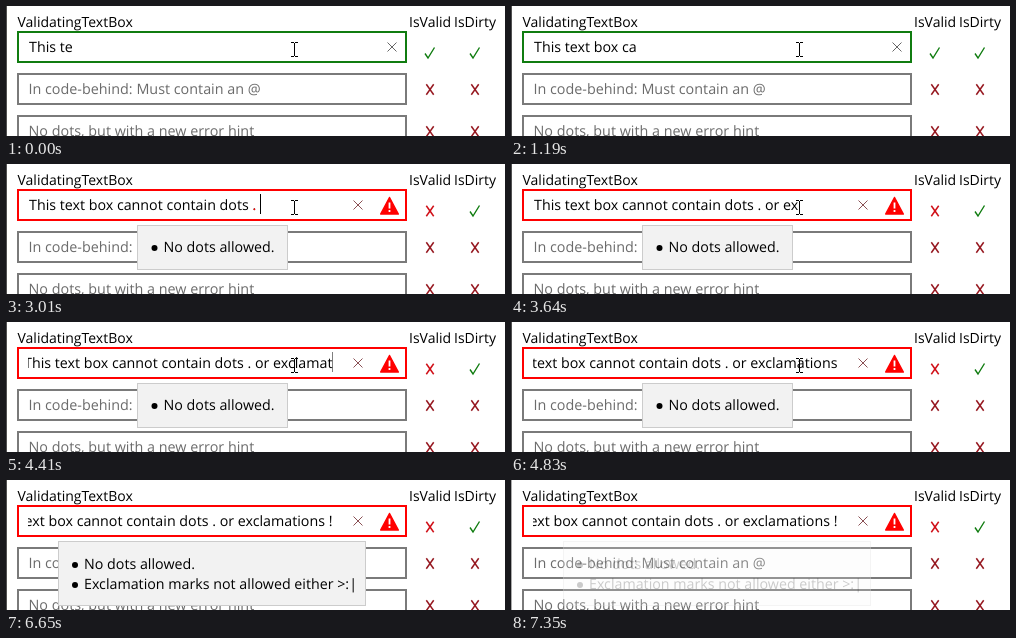
Animation of 499 by 130 pixels, one loop 7.42 s. Source, as an HTML page with a canvas:

```html
<!DOCTYPE html>
<html lang="en">
<head>
<meta charset="utf-8">
<title>Validating text box</title>
<style>
  html, body { margin: 0; width: 100%; height: 100%; overflow: hidden; background: #fff; }
  canvas { display: block; }
</style>
</head>
<body>
<canvas id="stage" width="499" height="130"></canvas>
<script>
const ctx = document.getElementById('stage').getContext('2d');
const LOOP = 7420, TICK = 70;
const ERROR_AT = 2870, SECOND_ERROR_AT = 5180, BLUR_AT = 7140;
const GREEN = '#107c10', RED = '#ff0000', DARK_RED = '#961820', GRAY = '#7a7a7a';
const LEFT = 23;

// Each burst is typed one character per tick.
const bursts = [
  [70, 'xt'], [560, ' b'], [840, 'o'], [980, 'x can'], [1400, 'not '],
  [1750, 'contain'], [2240, ' '], [2310, 'd'], [2450, 'ots'], [2800, ' '],
  [2870, '. '], [3150, 'o'], [3360, 'r e'], [3640, 'x'], [3920, 'cla'],
  [4270, 'matio'], [4690, 'n'], [4830, 's '], [5180, '!']
];
const caretOn = [
  [210, 560], [1260, 1400], [1540, 1610], [2170, 2450], [3010, 3150],
  [3220, 3360], [4130, 4270], [4900, 5320], [5880, 6300], [6790, BLUR_AT]
];
const caretFading = [4410, 5320, 5810, 6300, 6720];

function typedText(t) {
  let text = 'This te';
  for (const [start, chars] of bursts) {
    if (t >= start) text += chars.slice(0, Math.floor((t - start) / TICK) + 1);
  }
  return text;
}

function caretAlpha(t) {
  if (caretOn.some(([from, to]) => t >= from && t < to)) return 1;
  return caretFading.some(from => t >= from && t < from + TICK) ? 0.5 : 0;
}

function label(text, x, y, color = '#000', size = 14.25) {
  ctx.font = `${size}px "Open Sans", "Noto Sans", sans-serif`;
  ctx.fillStyle = color;
  ctx.fillText(text, x, y);
}

function line(points, color, width) {
  ctx.beginPath();
  for (const [x, y] of points) ctx.lineTo(x, y);
  ctx.strokeStyle = color;
  ctx.lineWidth = width;
  ctx.stroke();
}

function box(y, color) {
  ctx.strokeStyle = color;
  ctx.lineWidth = 2;
  ctx.strokeRect(12, y + 1, 388, 30);
}

function check(x, y) {
  line([[x - 5, y + 0.5], [x - 2, y + 5], [x + 4.5, y - 5.5]], GREEN, 1.4);
}

function diagonals(x, y, dx, dy, color, width) {
  line([[x - dx, y - dy], [x + dx, y + dy]], color, width);
  line([[x + dx, y - dy], [x - dx, y + dy]], color, width);
}

function cross(x, y, color = DARK_RED) {
  diagonals(x, y, 3.7, 5.2, color, 1.5);
}

function warningIcon() {
  ctx.fillStyle = RED;
  ctx.strokeStyle = RED;
  ctx.lineWidth = 1.5;
  ctx.lineJoin = 'round';
  ctx.beginPath();
  ctx.moveTo(383.5, 33.5);
  ctx.lineTo(392.3, 50);
  ctx.lineTo(374.7, 50);
  ctx.closePath();
  ctx.fill();
  ctx.stroke();
  ctx.fillStyle = '#fff';
  ctx.fillRect(382.6, 38.5, 1.8, 6);
  ctx.fillRect(382.6, 46, 1.8, 2);
  ctx.lineJoin = 'miter';
}

function input(t) {
  const error = t >= ERROR_AT;
  const text = typedText(t);
  const right = error ? 327 : 366;
  box(25, error ? RED : GREEN);

  ctx.save();
  ctx.beginPath();
  ctx.rect(LEFT - 1, 27, right - LEFT + 1, 28);
  ctx.clip();
  label('', 0, 0);
  const width = ctx.measureText(text).width;
  const start = LEFT - Math.max(0, LEFT + width - (right - 0.5));
  label(text, start, 46);
  if (error && t < 3150) {
    const before = text.slice(0, text.indexOf('.'));
    label('.', start + ctx.measureText(before).width, 46, RED);
  }
  ctx.globalAlpha = caretAlpha(t);
  ctx.fillStyle = '#000';
  ctx.fillRect(Math.min(Math.round(start + width), right - 1), 30, 1, 20);
  ctx.restore();

  diagonals(error ? 352 : 386, 41, 4.5, 4.5, error ? '#8a5054' : '#666', 1);
  if (error) warningIcon();
}

function tooltip(x, y, w, h, textX, baseline, lines, alpha) {
  ctx.save();
  ctx.globalAlpha = alpha;
  ctx.fillStyle = '#f2f2f2';
  ctx.fillRect(x, y, w, h);
  ctx.strokeStyle = '#cccccc';
  ctx.lineWidth = 1;
  ctx.strokeRect(x + 0.5, y + 0.5, w - 1, h - 1);
  lines.forEach((text, i) => {
    const lineY = baseline + i * 20;
    label(text, textX, lineY);
    ctx.beginPath();
    ctx.arc(textX - 9, lineY - 4, 3, 0, Math.PI * 2);
    ctx.fill();
  });
  ctx.restore();
}

function tooltips(t) {
  const dots = 'No dots allowed.';
  if (t >= SECOND_ERROR_AT) {
    const faded = t < BLUR_AT ? 0 : Math.floor((t - BLUR_AT) / TICK) + 1;
    tooltip(52, 61, 308, 65, 78, 89,
      [dots, 'Exclamation marks not allowed either >:|'], 1 - faded * 0.2);
  } else if (t >= ERROR_AT + TICK) {
    tooltip(131, 61, 151, 45, 157.5, 88, [dots], t < ERROR_AT + 2 * TICK ? 0.5 : 1);
  }
}

function textCursor(x, y) {
  ctx.fillStyle = '#000';
  for (const dy of [0, 14]) {
    ctx.fillRect(x - 3, y + dy, 3, 1);
    ctx.fillRect(x + 1, y + dy, 3, 1);
  }
  ctx.fillRect(x, y + 1, 1, 13);
}

function arrowCursor(x, y) {
  const outline = [[0, 0], [0, 16], [4, 12.5], [6.5, 18], [9, 17], [6.5, 11.5], [11, 11.5]];
  ctx.beginPath();
  for (const [dx, dy] of outline) ctx.lineTo(x + dx + 0.5, y + dy + 0.5);
  ctx.closePath();
  ctx.fillStyle = '#fff';
  ctx.fill();
  ctx.strokeStyle = '#000';
  ctx.lineWidth = 1;
  ctx.stroke();
}

function pointer(t) {
  const leaving = Math.floor((t - 6440) / TICK);
  if (leaving < 0) textCursor(288, 36);
  else if (leaving < 3) arrowCursor(308 + leaving * 32, 56 + leaving * 23);
}

function draw(t) {
  ctx.fillStyle = '#fff';
  ctx.fillRect(0, 0, 499, 130);
  ctx.fillStyle = t < BLUR_AT ? '#505050' : '#aaaaaa';
  ctx.fillRect(0, 0, 1, 130);

  label('ValidatingTextBox', 11.5, 21, '#000', 14);
  label('IsValid', 403, 21, '#000', 14);
  label('IsDirty', 448, 21, '#000', 14);

  input(t);
  if (t < ERROR_AT) check(424, 47);
  else cross(424, 47, '#d01018');
  check(469, 47);

  const hints = ['In code-behind: Must contain an @', 'No dots, but with a new error hint'];
  hints.forEach((hint, i) => {
    const y = 67 + i * 42;
    box(y, GRAY);
    label(hint, 22.5, y + 21, '#6b6b6b', 14.35);
    cross(424, y + 16.5);
    cross(469, y + 16.5);
  });

  tooltips(t);
  pointer(t);
}

ctx.textRendering = 'geometricPrecision';
const began = performance.now();
function tick() {
  draw((performance.now() - began) % LOOP);
  requestAnimationFrame(tick);
}
tick();
</script>
</body>
</html>
```
